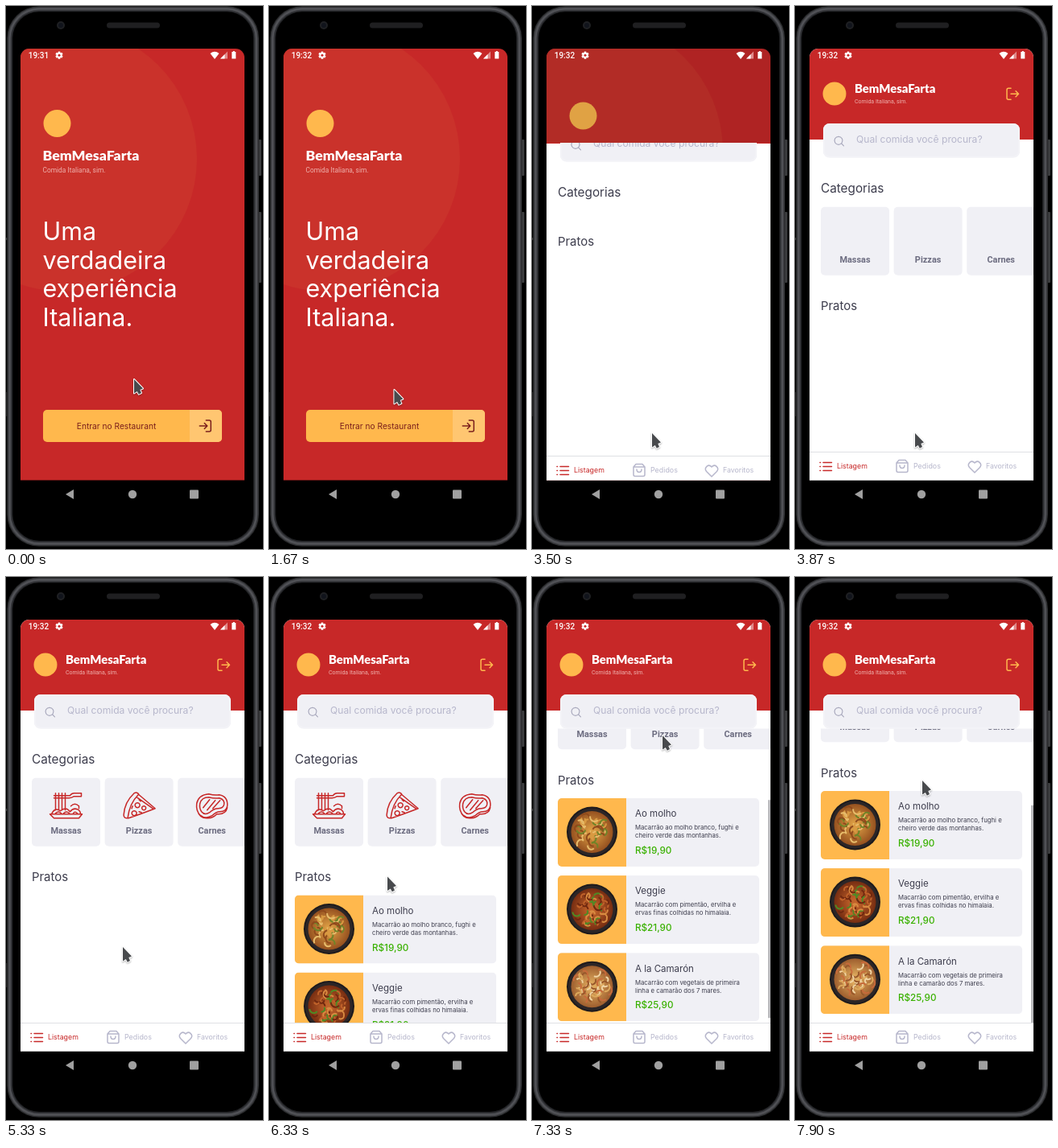
Write an HTML page with a canvas that moves like this. It is 319 px wide and 675 px high and loops after 8000 ms.

```html
<!DOCTYPE html>
<html lang="pt">
<head>
<meta charset="utf-8">
<title>Restaurante</title>
<style>
html, body { margin: 0; width: 100%; height: 100%; overflow: hidden; background: #000; }
canvas { display: block; width: 319px; height: 675px; }
</style>
</head>
<body>
<canvas id="stage"></canvas>
<script>
const LOOP = 8000, W = 319, H = 675;
const RED = '#c72828', GOLD = '#ffb84d', CARD = '#f0f0f5', MUTED = '#b7b7cc', INK = '#3d3d4d';
const BRAND = 'BemMesaFarta';
const SANS = 'Inter, sans-serif', ROBOTO = 'Roboto, sans-serif', LATO = 'Lato, sans-serif';

const canvas = document.getElementById('stage');
const ctx = canvas.getContext('2d');
const dpr = window.devicePixelRatio || 1;
canvas.width = W * dpr;
canvas.height = H * dpr;

// Timing: the picture only changes at these moments
const ticks = (from, to, n) =>
  Array.from({ length: n }, (_, i) => from + (to - from) * i / (n - 1));
const STEPS = [0, 1470, ...ticks(1670, 2100, 12), 2500, 3500, ...ticks(3670, 3870, 3),
  ...ticks(4700, 4900, 4), 5170, 5250, 5330, 5430, 5530, ...ticks(5670, 5930, 5), 6170, 6330,
  6630, 6700, 6770, 6830, 6900, 7000, 7100, 7230, 7330, 7530, 7630, 7770, 7830, 7900];

// Keys: time, values
const CURSOR = [[0, 158, 463], [1469, 158, 463], [1470, 155, 471], [1630, 155, 471],
  [2100, 148, 530], [4640, 148, 530], [4900, 149, 510], [5090, 149, 510], [5330, 144, 459],
  [5530, 141, 437], [5930, 143, 386], [6170, 146, 372], [6560, 146, 371], [6830, 152, 310],
  [7330, 161, 196], [7700, 161, 196], [7900, 157, 252]];
const SCROLL = [[0, 0], [6700, 0], [6830, 14.3], [7330, 120.5], [7630, 129.5]];

function track(keys, t) {
  const i = keys.findIndex(k => k[0] > t);
  if (i < 0) return keys[keys.length - 1].slice(1);
  const a = keys[i - 1], b = keys[i], f = (t - a[0]) / (b[0] - a[0]);
  return a.slice(1).map((v, j) => v + (b[j + 1] - v) * f);
}

// Drawing helpers
function text(str, x, y, size, color, weight = 400, family = SANS, align = 'left') {
  ctx.font = `${weight} ${size}px ${family}`;
  ctx.fillStyle = color;
  ctx.textAlign = align;
  ctx.fillText(str, x, y);
}
function rect(x, y, w, h, color) {
  ctx.fillStyle = color;
  ctx.fillRect(x, y, w, h);
}
function round(x, y, w, h, r, fill, stroke, width = 1) {
  ctx.beginPath();
  ctx.roundRect(x, y, w, h, r);
  if (fill) { ctx.fillStyle = fill; ctx.fill(); }
  if (stroke) { ctx.strokeStyle = stroke; ctx.lineWidth = width; ctx.stroke(); }
}
function disc(x, y, r, color) {
  ctx.beginPath();
  ctx.arc(x, y, r, 0, 7);
  ctx.fillStyle = color;
  ctx.fill();
}
function path(d, x, y, { fill, stroke, width = 1.4 }) {
  const p = new Path2D(d);
  ctx.save();
  ctx.translate(x, y);
  ctx.lineCap = ctx.lineJoin = 'round';
  if (fill) { ctx.fillStyle = fill; ctx.fill(p); }
  if (stroke) { ctx.strokeStyle = stroke; ctx.lineWidth = width; ctx.stroke(p); }
  ctx.restore();
}
function clipped(x, y, w, h, r, draw) {
  ctx.save();
  ctx.beginPath();
  ctx.roundRect(x, y, w, h, r);
  ctx.clip();
  draw();
  ctx.restore();
}
function seeded(seed) {
  return () => (seed = seed * 16807 % 2147483647) / 2147483647;
}

function phone() {
  rect(0, 0, W, H, '#000');
  round(313.5, 166, 3.5, 45, 1, '#3a3b3d');
  round(313.5, 256, 3.5, 88, 1, '#3a3b3d');
  rect(0, 288, 1.5, 3, '#333');
  rect(0, 480, 1.5, 30, '#1c1c1d');
  // Metal rim, from the outer edge inwards
  ['#2a2b2d', '#48494d', '#55565b', '#3a3b3f', '#222326', '#000'].forEach((color, i) => {
    const d = 1.3 + i * 1.4;
    round(d, d - 1, 315.3 - 2 * d, 674 - 2 * d, 41 - d, color);
  });
  round(125, 20.5, 66, 7, 3.5, '#1f1f21');
  disc(68, 24, 5, '#1f2023');
  disc(68, 24, 3, '#11141c');
  path('M10 0V12L0 6Z', 74, 601, { fill: '#a0a0a0' });
  disc(157, 607, 5.2, '#a0a0a0');
  round(228, 601.5, 11, 11, 1, '#a0a0a0');
}

function statusBar(clock) {
  text(clock, 27.7, 65, 10, '#fff', 500, ROBOTO);
  ctx.save();
  ctx.translate(66, 61.2);
  for (let i = 0; i < 3; i++) {
    rect(-1.3, -4.6, 2.6, 9.2, '#fff');
    ctx.rotate(Math.PI / 3);
  }
  ctx.restore();
  disc(66, 61.2, 3.4, '#fff');
  disc(66, 61.2, 1.5, RED);
  path('M0 2.5Q5.5 -2 11 2.5L5.5 9.5Z', 253.5, 56.5, { fill: '#fff' });
  path('M9 0V9H0Z', 266, 56.5, { fill: '#e08a8a' });
  path('M5.5 3.5V9H0Z', 266, 56.5, { fill: '#fff' });
  path('M1.5 0H3.5V1H5V9.5H0V1H1.5Z', 280.3, 56, { fill: '#fff' });
}

function welcome(pressed, shift) {
  rect(18, 53, 278, 537, RED);
  disc(72, 190 + shift, 165, '#ca322b');
  disc(63.5, 146 + shift, 17, GOLD);
  text(BRAND, 45.5, 191.5 + shift, 17.7, '#fff', 900, LATO);
  text('Comida Italiana, sim.', 45.5, 207.3 + shift, 8.4, '#eeb0ac', 400, ROBOTO);
  ['Uma', 'verdadeira', 'experiência', 'Italiana.'].forEach((line, i) =>
    text(line, 45.5, 291.3 + i * 35.4 + shift, 30.5, '#fff'));

  ctx.save();
  ctx.globalAlpha = pressed ? 0.2 : 1;
  clipped(46, 502 + shift, 222, 40, 5, () => {
    rect(46, 502 + shift, 222, 40, GOLD);
    rect(228, 502 + shift, 40, 40, pressed ? GOLD : '#ffc671');
  });
  text('Entrar no Restaurant', 137, 526.3 + shift, 10.2, '#7a1f1c', 400, SANS, 'center');
  path('M8 0H12Q14 0 14 2V12Q14 14 12 14H8M0 7H9.5M6 3.5L9.5 7L6 10.5', 240.3, 515 + shift,
    { stroke: '#7a1f1c', width: 1.5 });
  ctx.restore();
}

const CATEGORIES = [
  ['Massas', `M7 1V22M11 1V22M15 1V22M19 1V22M5 4H25Q27 1 30 1H39V5H30Q27 7 24 7H5
    M2 27Q6 18 13 23Q20 17 25 24Q29 19 34 21Q38 23 38 27
    M7 26Q11 22 15 27M17 26Q21 22 25 27M29 26Q31 23 34 26
    M0 27H40L36 32H5ZM26 17Q31 12 36 17V20`],
  ['Pizzas', `M14 1Q18 -1 20 3L40 20Q22 27 7 32Q1 33 1 28Q2 12 14 1Z
    M19 3Q8 14 6 32M17 6L37 20M18 13a3 3 0 1 0 .1 0M14 23a3 3 0 1 0 .1 0
    M26 17a2.5 2.5 0 1 0 .1 0M20 9L22 11M11 20L12 17M20 24L23 25`],
  ['Carnes', `M1 14Q3 3 16 2Q23 4 29 3Q40 5 39 17Q38 24 30 24Q25 24 20 29Q12 34 5 28Q0 23 1 14Z
    M5 14Q7 6 16 6Q23 8 29 7Q36 9 35 15Q34 20 28 20Q22 20 17 25Q11 29 7 24Q4 20 5 14Z
    M2 23Q5 33 15 32Q21 32 26 27Q37 28 39 19M9 19L17 9M14 22L24 10M21 20L30 10`]
];

function categories(top, icons) {
  CATEGORIES.forEach(([name, shape], i) => {
    const x = 32 + i * 90.6;
    round(x, top, 85, 85, 5, CARD);
    if (icons) path(shape, x + 22.5, top + 18, { stroke: RED, width: 1.5 });
    text(name, x + 42.5, top + 69.5, 10.9, '#6c6c80', 700, ROBOTO, 'center');
  });
}

const DISHES = [
  ['Ao molho', 'Macarrão ao molho branco, fughi e', 'cheiro verde das montanhas.', 'R$19,90',
    ['#d99a42', '#8f4a1c', '#e8bd6c', '#6f8428']],
  ['Veggie', 'Macarrão com pimentão, ervilha e', 'ervas finas colhidas no himalaia.', 'R$21,90',
    ['#c0622a', '#70280f', '#d88a40', '#4f8a25']],
  ['A la Camarón', 'Macarrão com vegetais de primeira', 'linha e camarão dos 7 mares.', 'R$25,90',
    ['#dda95c', '#98572a', '#f0d3a2', '#c76a3b']]
];

function plate(x, y, [mid, edge, light, accent], seed) {
  const rand = seeded(seed);
  disc(x, y, 31.5, '#1d1a1c');
  disc(x, y, 29.5, '#2c2627');
  const glow = ctx.createRadialGradient(x, y, 4, x, y, 28);
  glow.addColorStop(0, mid);
  glow.addColorStop(1, edge);
  disc(x, y, 26, glow);
  ctx.lineWidth = 2;
  for (let i = 0; i < 44; i++) {
    const a = rand() * 6.3, d = Math.sqrt(rand()) * 20, start = rand() * 6.3;
    ctx.strokeStyle = [light, mid, edge, accent][i % 4];
    ctx.beginPath();
    ctx.arc(x + Math.cos(a) * d, y + Math.sin(a) * d, 3 + rand() * 3, start, start + 2.5);
    ctx.stroke();
  }
}

function dishes(top, photos) {
  DISHES.forEach(([name, line1, line2, price, tones], i) => {
    const y = top + i * 96.1;
    clipped(32, y, 250, 85, 5, () => {
      rect(32, y, 250, 85, CARD);
      rect(32, y, 85, 85, GOLD);
      if (photos) plate(74.5, y + 42, tones, 71 + i * 997);
    });
    text(name, 128, y + 23.3, 11.5, INK);
    text(line1, 128, y + 39.3, 7.75, INK);
    text(line2, 128, y + 49.3, 7.75, INK);
    text(price, 128, y + 69.2, 11.7, '#39b100', 500);
  });
}

function tabBar() {
  rect(18, 554, 278, 36, '#fff');
  rect(18, 554, 278, 1, '#dfe0e4');
  path('M4.5 0H15M4.5 5H15M4.5 10H15M.5 0H1M.5 5H1M.5 10H1', 30.5, 567.5,
    { stroke: RED, width: 1.5 });
  text('Listagem', 52, 575, 8.8, RED);
  path('M3 0H11L14 3.5V13Q14 15 12 15H2Q0 15 0 13V3.5ZM0 3.5H14M4 6.5Q4 10 7 10Q10 10 10 6.5',
    126, 564.5, { stroke: MUTED, width: 1.5 });
  text('Pedidos', 147, 575, 8.9, MUTED);
  path('M8 14L1.5 7.5C-2 3 4 -2.5 8 2C12 -2.5 18 3 14.5 7.5Z', 215, 566,
    { stroke: MUTED, width: 1.5 });
  text('Favoritos', 237, 575, 8.8, MUTED);
}

function dashboard(t, scroll) {
  const loaded = t >= 3870;
  rect(18, 53, 278, 537, '#fff');
  rect(18, 53, 278, 113, RED);
  disc(49, 109, 14.5, GOLD);
  text(BRAND, 74, 107.5, 14.8, '#fff', 900, LATO);
  text('Comida Italiana, sim.', 74, 120.5, 7, '#eeb0ac', 400, ROBOTO);
  path('M5 0H2Q0 0 0 2V12Q0 14 2 14H5M5 7H14.5M11 3.5L14.5 7L11 10.5', 263, 102.3,
    { stroke: GOLD, width: 1.5 });

  clipped(18, 166, 278, 389, 0, () => {
    text('Categorias', 32, 232 - scroll, 15.3, INK);
    if (loaded) categories(249.7 - scroll, t >= 4700);
    text('Pratos', 32, (loaded ? 378 : 293) - scroll, 14.9, INK);
    if (t >= 5670) dishes(395.5 - scroll, t >= 5800);
  });
  if (t >= 6630) rect(293, 188.5 + scroll * 0.736, 3, 271, '#b9b9bc');

  // Covers rows that slide up behind the search field
  rect(18, 166, 278, 22.5, '#fff');
  round(35, 146, 244, 42.5, 8, CARD);
  round(36, 147, 242, 40.5, 7, null, '#f3f3f7', 2);
  path('M5 0a5 5 0 1 0 .01 0M8.6 8.6L11.5 11.5', 49, 162.3, { stroke: '#a9a9bd', width: 1.2 });
  text('Qual comida você procura?', 76, 170, 12.1, MUTED);
  tabBar();
}

function screen(t, scroll) {
  if (t < 3500) return welcome(t >= 2500, 0);
  if (t >= 3670) return dashboard(t, scroll);
  welcome(false, -9.5);
  rect(18, 53, 278, 537, 'rgba(0,0,0,.12)');
  clipped(18, 170, 278, 420, 0, () => {
    ctx.translate(0, 5);
    dashboard(t, 0);
  });
}

function pointer(x, y) {
  const d = 'M0 0L11 11.5L7.3 13L9 17L5.8 18.7L3.8 15L0 17.5Z';
  ctx.save();
  ctx.shadowColor = 'rgba(0,0,0,.3)';
  ctx.shadowBlur = 2 * dpr;
  ctx.shadowOffsetY = dpr;
  path(d, x + 1, y + 1, { stroke: '#fff', width: 2 });
  ctx.restore();
  path(d, x + 1, y + 1, { fill: '#484a4d' });
}

function draw(now) {
  const time = now % LOOP;
  const t = STEPS.filter(s => s <= time).pop() || 0;
  const [scroll] = track(SCROLL, t);
  ctx.setTransform(dpr, 0, 0, dpr, 0, 0);
  phone();
  clipped(18, 53, 278, 536.5, [11, 11, 0, 0], () => screen(t, scroll));
  statusBar(t < 1470 ? '19:31' : '19:32');
  pointer(...track(CURSOR, t));
}

function frame() {
  draw(performance.now());
  requestAnimationFrame(frame);
}
frame();
</script>
</body>
</html>
```
